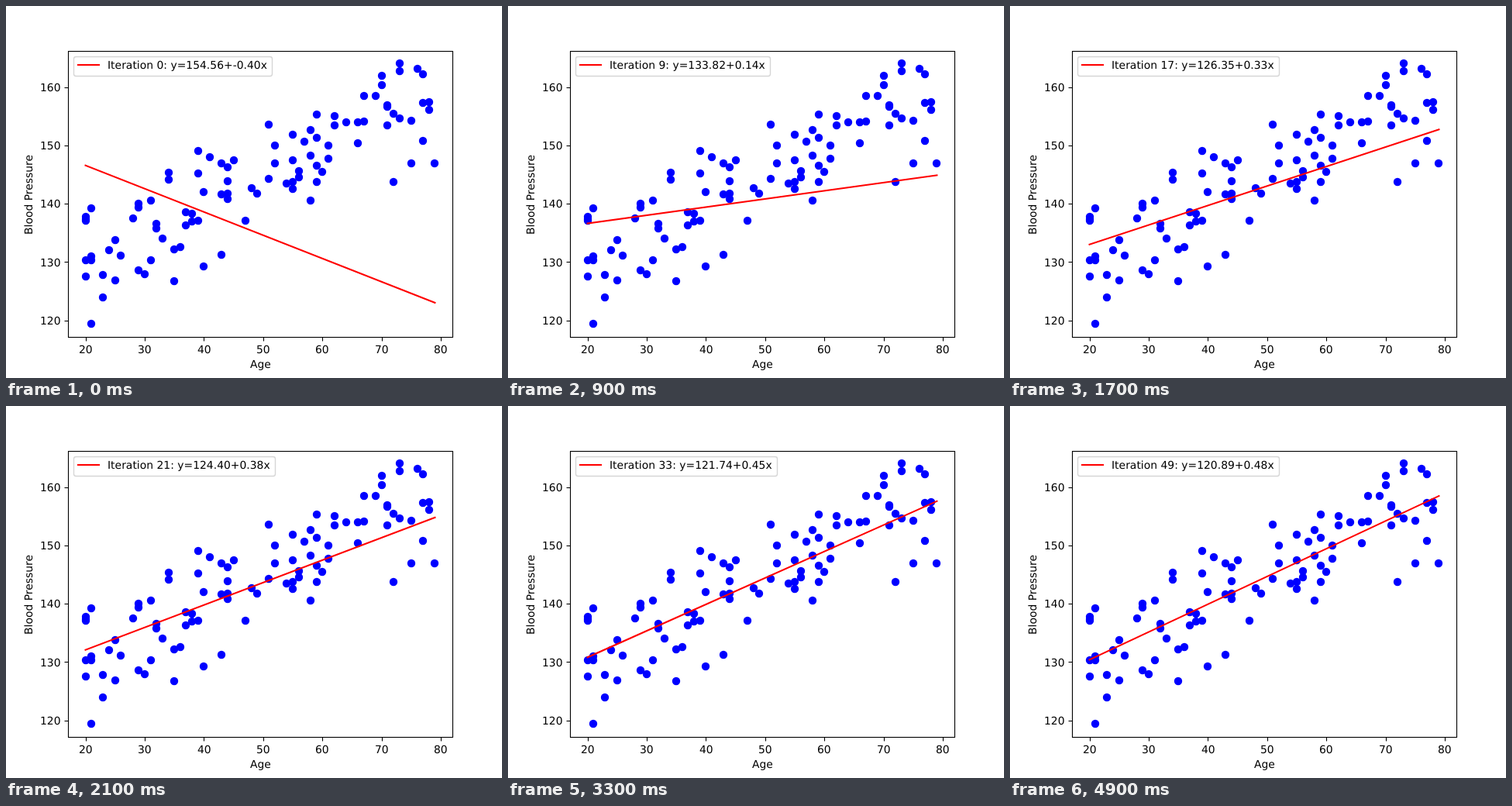
Write an HTML page with a canvas that moves like this. It is 640 by 480 pixels and loops after 5 s.

```html
<!DOCTYPE html>
<html lang="en">
<head>
<meta charset="utf-8">
<title>Regression fit</title>
<style>
  html, body { margin: 0; width: 100%; height: 100%; overflow: hidden; background: #fff; }
  canvas { display: block; }
</style>
</head>
<body>
<canvas id="plot" width="640" height="480"></canvas>
<script>
const ctx = document.getElementById('plot').getContext('2d');
const FIRST_AGE = 20, LAST_AGE = 79, COUNT = 100, STEPS = 50, STEP_MS = 100;

// Mersenne Twister: returns a function giving 32-bit integers
function twister(seed) {
  const size = 624, state = new Uint32Array(size);
  state[0] = seed;
  for (let i = 1; i < size; i++) {
    const prev = state[i - 1];
    state[i] = Math.imul(1812433253, prev ^ (prev >>> 30)) + i;
  }
  let k = 0;
  return () => {
    const next = (k + 1) % size;
    const y = (state[k] & 0x80000000) | (state[next] & 0x7fffffff);
    let x = state[(k + 397) % size] ^ (y >>> 1) ^ (y & 1 ? 0x9908b0df : 0);
    state[k] = x;
    k = next;
    x ^= x >>> 11;
    x ^= (x << 7) & 0x9d2c5680;
    x ^= (x << 15) & 0xefc60000;
    return (x ^ (x >>> 18)) >>> 0;
  };
}

const bits = twister(0);
const unit = () => ((bits() >>> 5) * 67108864 + (bits() >>> 6)) / 2 ** 53;

function randomAge() {
  let years;
  do years = bits() & 63; while (years > LAST_AGE - FIRST_AGE);
  return FIRST_AGE + years;
}

// Polar method: each accepted pair gives two normal values
function normalPair() {
  let a, b, r;
  do {
    a = 2 * unit() - 1;
    b = 2 * unit() - 1;
    r = a * a + b * b;
  } while (r >= 1 || r === 0);
  const f = Math.sqrt(-2 * Math.log(r) / r);
  return [f * b, f * a];
}

// Pressure rises by half a unit per year, with a spread of 5
const ages = Array.from({ length: COUNT }, randomAge);
const noise = Array.from({ length: COUNT / 2 }, normalPair).flat();
const people = ages.map((age, i) => ({ age, bp: 120 + age / 2 + 5 * noise[i] }));

const px = age => 102.545 + (age - FIRST_AGE) * 7.6425;
const py = bp => 104.7 + (160 - bp) * 7.525;
const snap = v => Math.floor(v + 0.5) + 0.5;

function line(x1, y1, x2, y2, color, width, cap = 'butt') {
  ctx.strokeStyle = color;
  ctx.lineWidth = width;
  ctx.lineCap = cap;
  ctx.beginPath();
  ctx.moveTo(x1, y1);
  ctx.lineTo(x2, y2);
  ctx.stroke();
}

// Text starts on a whole pixel; align is the share of its width left of x
function text(str, x, y, align = 0) {
  ctx.fillStyle = '#000';
  ctx.fillText(str, Math.round(x - align * ctx.measureText(str).width), Math.round(y));
}

function drawPoints() {
  ctx.fillStyle = '#00f';
  for (const { age, bp } of people) {
    ctx.beginPath();
    ctx.arc(Math.round(px(age)), Math.round(py(bp)), 5.2, 0, 2 * Math.PI);
    ctx.fill();
  }
}

function drawAxes() {
  for (let age = 20; age <= 80; age += 10) {
    const x = snap(px(age));
    line(x, 427.5, x, 432.5, '#000', 1.11);
    text(age, px(age), 448, 0.5);
  }
  for (let bp = 120; bp <= 160; bp += 10) {
    const y = snap(py(bp));
    line(75.5, y, 80.5, y, '#000', 1.11);
    text(bp, 70.3, py(bp) + 5.2, 1);
  }
  ctx.lineWidth = 1.11;
  ctx.strokeRect(80.5, 58.5, 496, 369);
  text('Age', 328, 467, 0.5);
  ctx.save();
  ctx.translate(34, 295);
  ctx.rotate(-Math.PI / 2);
  text('Blood Pressure', 0, 0);
  ctx.restore();
}

function drawLegend(label) {
  const right = snap(136.95 + ctx.measureText(label).width);
  ctx.beginPath();
  ctx.roundRect(87.5, 65.5, right - 87.5, 25, 2.78);
  ctx.fillStyle = 'rgba(255,255,255,.8)';
  ctx.fill();
  ctx.strokeStyle = 'rgba(204,204,204,.8)';
  ctx.lineWidth = 1.39;
  ctx.stroke();
  line(93, 76, 120, 76, '#f00', 2.08, 'square');
  text(label, 131, 81);
}

function draw(n) {
  // Gradient descent: the remaining error shrinks by a tenth per iteration
  const error = 0.9 ** n;
  const base = 120.698 + 33.864 * error;
  const slope = 0.481 - 0.88 * error;
  const fit = age => py(base + slope * age);

  ctx.fillStyle = '#fff';
  ctx.fillRect(0, 0, 640, 480);
  ctx.font = '13.889px "DejaVu Sans", sans-serif';
  ctx.textRendering = 'geometricPrecision';
  ctx.letterSpacing = '0.02px';
  drawPoints();
  line(px(FIRST_AGE), fit(FIRST_AGE), px(LAST_AGE), fit(LAST_AGE), '#f00', 2.08, 'square');
  drawAxes();
  drawLegend(`Iteration ${n}: y=${base.toFixed(2)}+${slope.toFixed(2)}x`);
}

function tick() {
  draw(Math.floor(performance.now() / STEP_MS) % STEPS);
  requestAnimationFrame(tick);
}
tick();
</script>
</body>
</html>
```
